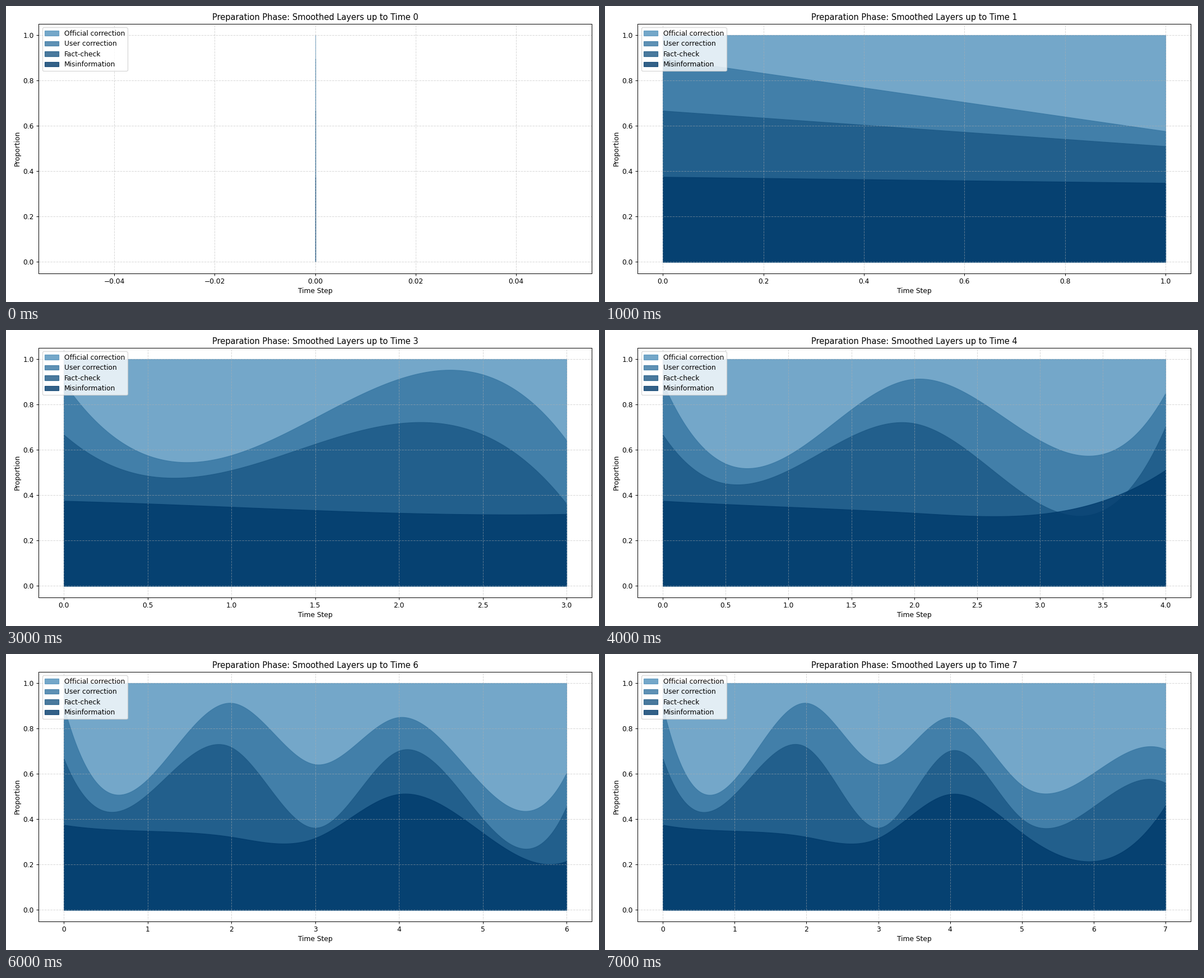
Recreate the animation shown at these times as a matplotlib script. Size 1058x529 px, loop 8000 ms.

```python
import matplotlib.pyplot as plt
import numpy as np
from matplotlib.animation import FuncAnimation

WIDTH, HEIGHT, DPI = 1058, 529, 88
STEPS = 8
NAMES = ["Misinformation", "Fact-check", "User correction", "Official correction"]
COLORS = ["#003a6b", "#1b5885", "#3676a2", "#5191bc"]


def key_shares():
    """Share of each layer at whole steps; the official one takes the rest."""
    false = np.r_[np.linspace(0.375, 0.322, 3), 0.317, 0.511, 0.340, 0.215, 0.461]
    fact = np.array([0.292, 0.162, 0.395, 0.045, 0.191, 0.062, 0.241, 0.099])
    user = np.full(STEPS, 0.148)
    user[:4] = 0.230, 0.066, 0.196, 0.280
    return np.array([false, fact, user, 1 - false - fact - user])


def basis(x, count):
    """Truncated powers spanning the not-a-knot cubics through count points."""
    powers = [x ** p for p in range(min(count, 4))]
    knots = [np.maximum(x - k, 0) ** 3 for k in range(2, count - 2)]
    return np.stack(powers + knots, axis=1)


def smooth(values, x):
    count = len(values)
    nodes = np.arange(count, dtype=float)
    return basis(x, count) @ np.linalg.solve(basis(nodes, count), values)


tops = np.cumsum(key_shares(), axis=0)
fig, ax = plt.subplots(figsize=(WIDTH / DPI, HEIGHT / DPI), dpi=DPI)
fig.subplots_adjust(left=58.4 / WIDTH, right=1044.8 / WIDTH,
                    bottom=51.4 / HEIGHT, top=1 - 32 / HEIGHT)


def draw(step):
    ax.clear()
    x = np.linspace(0, step, 300)
    for name, color, top in reversed(list(zip(NAMES, COLORS, tops))):
        ax.fill_between(x, 0, smooth(top[:step + 1], x),
                        color=color, alpha=0.8, label=name)
    ax.set_title(f"Preparation Phase: Smoothed Layers up to Time {step}")
    ax.set_xlabel("Time Step", labelpad=3.3)
    ax.set_ylabel("Proportion", labelpad=3.3)
    ax.legend(loc="upper left", labelspacing=0.45)
    ax.grid(True, linestyle="--", alpha=0.5)
    return []


anim = FuncAnimation(fig, draw, frames=STEPS, init_func=lambda: [],
                     interval=1000, repeat=True, repeat_delay=0)
plt.show()
```
